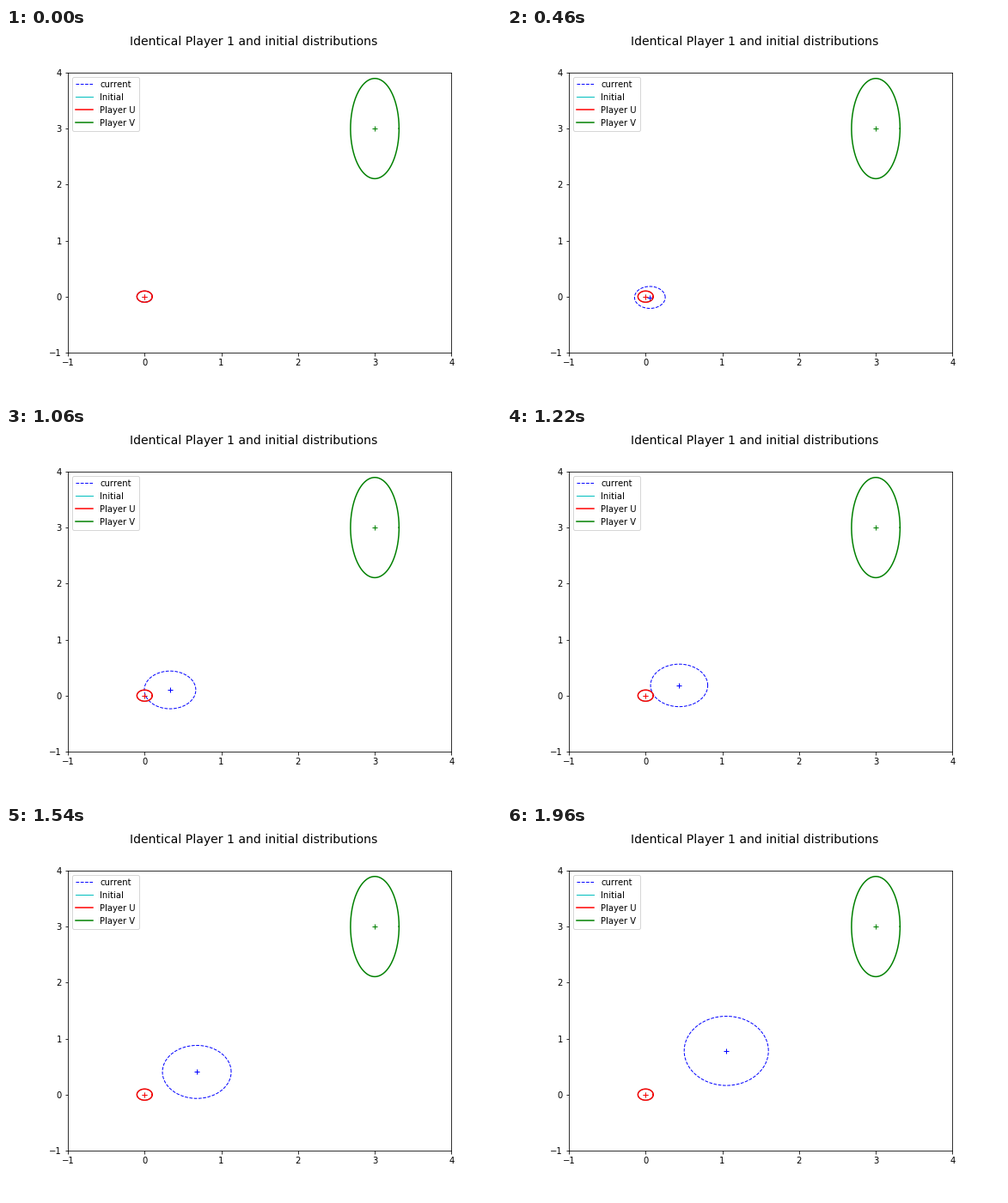
Animation, 576 px wide and 432 px high, one loop 1.98 s. Source, as a matplotlib script:

```python
import numpy as np
import matplotlib.pyplot as plt
from matplotlib.animation import FuncAnimation

FRAMES = 99
STEP_MS = 20

plt.rcParams.update({
    "font.family": "DejaVu Sans",
    "font.size": 10,
    "text.kerning_factor": 6,
})

THETA = np.linspace(0, 2 * np.pi, 200)
START = (0, 0, .1, .1)
PLAYER_V = (3, 3, np.sqrt(.1), np.sqrt(.8))


def ellipse(x, y, rx, ry):
    return x + rx * np.cos(THETA), y + ry * np.sin(THETA)


def pose(t):
    """Centre and radii of the moving distribution, t from 0 to 1."""
    x = t * (-.094 + 1.5 * t - .354 * t**2)
    y = t * (.016 - 1.018 * t + 3.283 * t**2 - 1.5 * t**3)
    rx = .1 + .42 * t + .029 * t**2
    ry = .1 + .398 * t + .02 * t**2 + .1 * t**3
    return x, y, rx, ry


def add_player(shape, style, lw, label):
    """Outline and centre mark of one distribution."""
    line, = ax.plot(*ellipse(*shape), style, lw=lw, label=label)
    mark, = ax.plot(*shape[:2], "+", color=line.get_color(), ms=6, mew=1)
    return line, mark


fig, ax = plt.subplots(figsize=(8, 6), dpi=72)
fig.subplots_adjust(left=.125, right=.9, bottom=.125, top=.88)
fig.suptitle("Identical Player 1 and initial distributions", fontsize=14)
ax.set(xlim=(-1, 4), ylim=(-1, 4), xticks=range(-1, 5), yticks=range(-1, 5))

current, centre = add_player(START, "b--", 1, "current")
add_player(START, "c", 1, "Initial")
add_player(START, "r", 1.5, "Player U")
add_player(PLAYER_V, "g", 1.5, "Player V")
ax.legend(loc="upper left")


def update(i):
    x, y, rx, ry = pose(i / (FRAMES - 1))
    current.set_data(*ellipse(x, y, rx, ry))
    centre.set_data([x], [y])
    return current, centre


anim = FuncAnimation(fig, update, frames=FRAMES, interval=STEP_MS, repeat=True)
plt.show()
```
